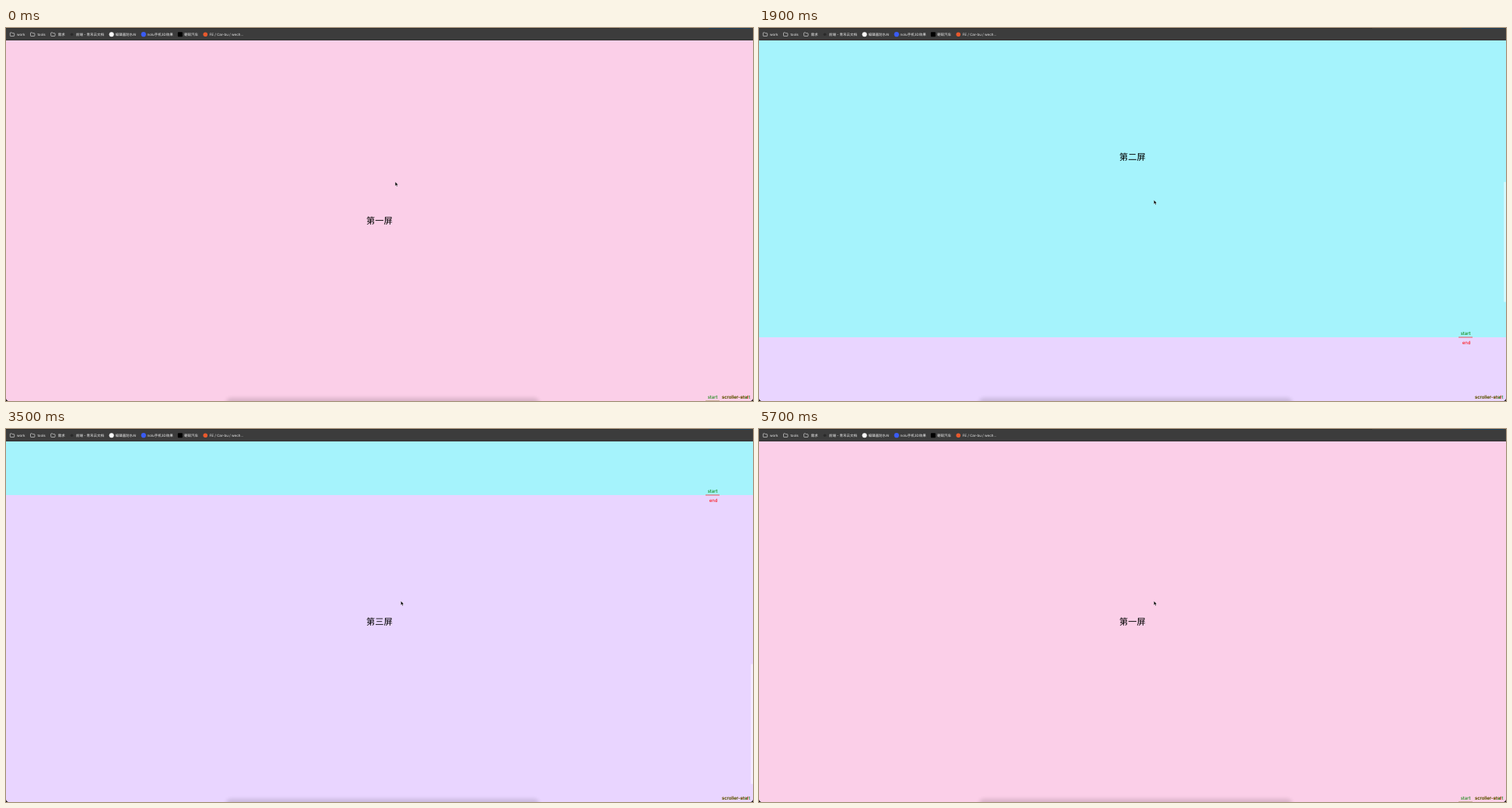
An HTML page for the animation above (6.1 s loop, 960x480 px).

```html
<!DOCTYPE html>
<html lang="zh-CN">
<head>
<meta charset="utf-8">
<title>Scroll sections</title>
<style>
  html, body { margin: 0; width: 100%; height: 100%; overflow: hidden; background: #e9d5ff; }
  svg { display: block; width: 960px; height: 480px; }
  text { font-family: Inter, "Noto Sans CJK SC", "Noto Sans CJK", sans-serif; text-rendering: geometricPrecision; white-space: pre; }
  .title { font-size: 11.25px; text-anchor: middle; }
  .bar text { font-size: 4.5px; fill: #f1f1f1; }
  .mark { font-size: 6px; }
  .right { text-anchor: end; }
  .start { fill: #008000; }
  .end { fill: #f00; }
</style>
</head>
<body>
<svg viewBox="0 0 960 480">
  <defs>
    <clipPath id="view"><rect y="16" width="960" height="464"/></clipPath>
    <filter id="soft" x="-10%" y="-100%" width="120%" height="300%"><feGaussianBlur stdDeviation="2.4"/></filter>
    <path id="folder" d="M.3 1.2q0-.7.7-.7h1.4l.8.8h1.9q.6 0 .6.6v2.5q0 .6-.6.6H.9q-.6 0-.6-.6z" fill="none" stroke="#e4e4e4" stroke-width=".65"/>
  </defs>

  <g clip-path="url(#view)">
    <rect y="16" width="960" height="464" fill="#e9d5ff"/>
    <text class="title" x="480" y="252.3">第三屏</text>
    <g id="second">
      <rect y="16" width="960" height="464" fill="#a5f3fc"/>
      <text class="title" x="480" y="252.3">第二屏</text>
    </g>
    <g id="first">
      <rect y="16" width="960" height="464" fill="#fbcfe8"/>
      <text class="title" x="480" y="252.3">第一屏</text>
    </g>
    <rect x="283" y="476" width="402" height="20" rx="6" opacity=".13" filter="url(#soft)"/>
    <g id="marks" class="mark">
      <rect x="899" y="479.6" width="18" height=".8" fill="#8a8a30"/>
      <text class="right start" x="914.5" y="476.8">start</text>
      <rect x="899" y="943.6" width="18" height=".8" fill="#f03030"/>
      <text class="right start" x="914.5" y="940.8">start</text>
      <text class="right end" x="914.5" y="953.2">end</text>
    </g>
    <g class="mark">
      <text class="end" x="920" y="476.8">scroller-end</text>
      <text class="start" x="920" y="476.8">scroller-start</text>
    </g>
    <rect id="thumb" x="957.2" width="2.8" height="154.7" rx="1.3" fill="#fff" opacity=".5"/>
  </g>

  <g class="bar">
    <rect width="960" height="16" fill="#3c3c3c"/>
    <rect width="788" height=".7" fill="#2b2b2b"/>
    <rect x="903" width="54" height=".8" fill="#17405f"/>
    <rect y="15.4" width="960" height=".6" fill="#333"/>
    <use href="#folder" x="5" y="5.4"/>
    <use href="#folder" x="31.2" y="5.4"/>
    <use href="#folder" x="57.4" y="5.4"/>
    <circle cx="84.6" cy="8.2" r="1.8" fill="#2a2a2a"/>
    <circle cx="135.6" cy="8.2" r="3" fill="#fff"/>
    <circle cx="176.8" cy="8.2" r="3.1" fill="#3a5cf5"/>
    <rect x="220.8" y="5.2" width="6" height="6" rx=".8" fill="#000"/>
    <circle cx="256.2" cy="8.3" r="2.8" fill="#e8592d"/>
    <text x="14" y="9.8">work</text>
    <text x="40.4" y="9.8">tools</text>
    <text x="66.7" y="9.8">需求</text>
    <text x="90" y="9.8">前端 - 青禾云文档</text>
    <text x="140.5" y="9.8">编辑器划水AI</text>
    <text x="181.6" y="9.8">nolu手机3D效果</text>
    <text x="229" y="9.8">朝砚汽车</text>
    <text x="261.5" y="9.8">FE / Car-bu / wech...</text>
  </g>

  <path d="M0 477.6V480H2.4Q0 480 0 477.6zM960 477.6V480H957.6Q960 480 960 477.6z" stroke="#000" stroke-width=".5"/>
  <path id="cursor" d="M0 0V5.2L1.2 4.1L2 6L2.9 5.6L2.1 3.8H3.7z" fill="#000" stroke="#fff" stroke-width=".3"/>
</svg>
<script>
  const LOOP = 6100, STEP = 100, VIEW = 464;
  // [time, scroll offset]
  const scroll = [
    [0, 0], [200, 0], [700, 106], [1200, 362], [1400, 425], [1900, 546],
    [2800, 890], [2900, 918], [3100, 928], [3500, 859], [4500, 243],
    [5000, 70], [5300, 17], [5700, 0], [LOOP, 0]
  ];
  const el = id => document.getElementById(id);
  const move = (node, x, y) => node.setAttribute("transform", `translate(${x} ${y})`);
  const [first, second, marks, thumb, cursor] =
    ["first", "second", "marks", "thumb", "cursor"].map(el);

  const slope = i => (scroll[i + 1][1] - scroll[i][1]) / (scroll[i + 1][0] - scroll[i][0]);

  // Harmonic mean keeps the curve free of overshoot
  function tangent(i) {
    if (i === 0 || i === scroll.length - 1) return 0;
    const a = slope(i - 1), b = slope(i);
    return a * b > 0 ? 2 * a * b / (a + b) : 0;
  }

  function scrollAt(t) {
    let i = 0;
    while (i < scroll.length - 2 && t >= scroll[i + 1][0]) i++;
    const [t0, a] = scroll[i], [t1, b] = scroll[i + 1];
    const d = t1 - t0, u = (t - t0) / d, v = 1 - u;
    return a * v * v * (1 + 2 * u) + b * u * u * (3 - 2 * u)
      + d * u * v * (tangent(i) * v - tangent(i + 1) * u);
  }

  function draw(now) {
    const t = Math.min(Math.floor(now % LOOP / STEP) * STEP, 5700);
    const s = scrollAt(t);
    move(first, 0, -Math.min(s, VIEW));
    move(second, 0, -Math.max(0, s - VIEW));
    move(marks, 0, -s);
    thumb.setAttribute("y", 16 + s / 3);
    thumb.style.display = t > 200 && t < 5700 ? "" : "none";
    const k = Math.min(1, t / 400);
    move(cursor, 500.2 + 7.3 * k, 198 + 23.4 * k);
  }

  const origin = performance.now();
  function tick() {
    draw(performance.now() - origin);
    requestAnimationFrame(tick);
  }
  tick();
</script>
</body>
</html>
```
